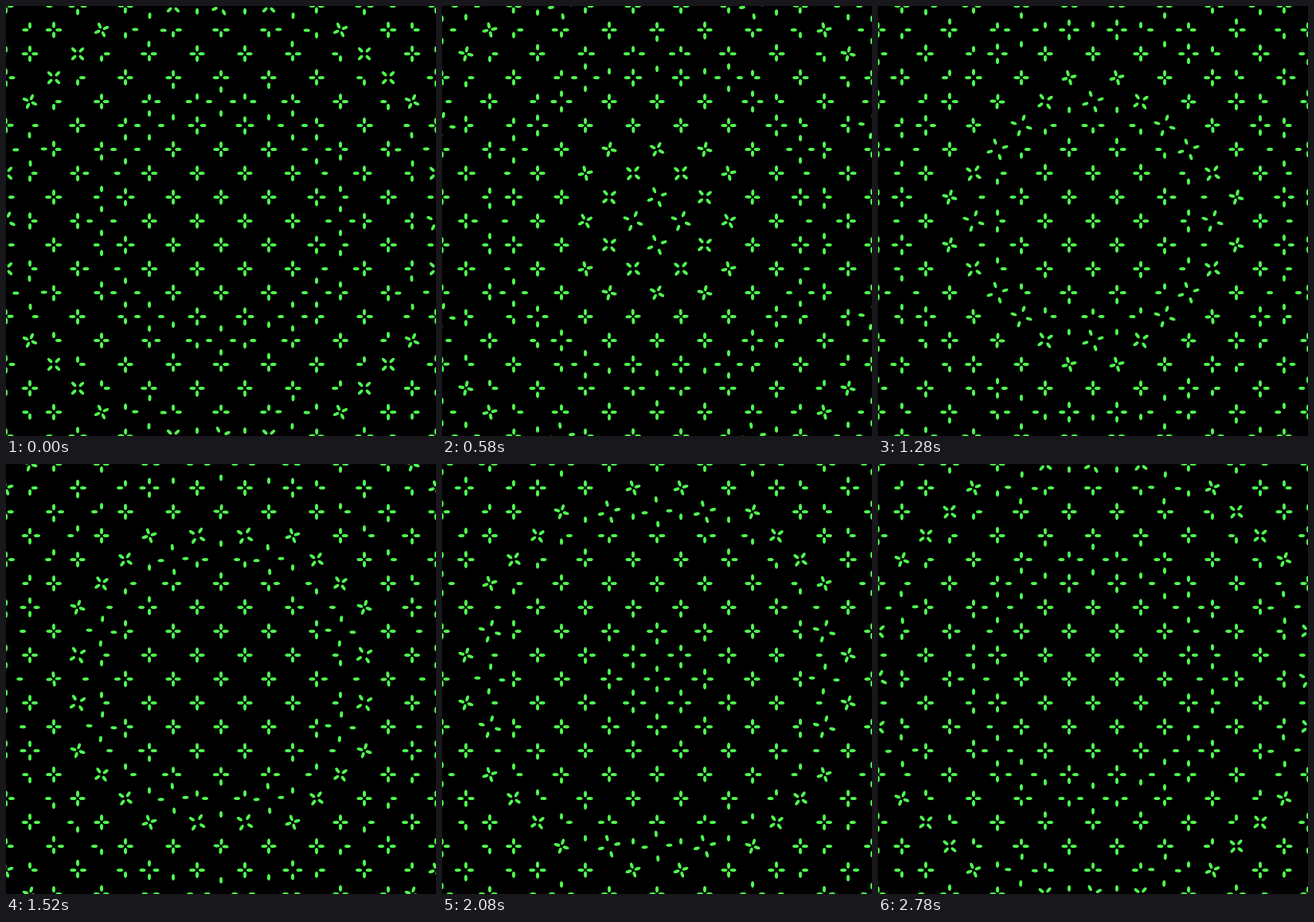
These frames come from a looping animation (540 px wide and 540 px high, 2800 ms). An HTML page:

```html
<!DOCTYPE html>
<html lang="en">
<head>
<meta charset="utf-8">
<title>Petal lattice</title>
<style>
  html, body { margin: 0; width: 100%; height: 100%; overflow: hidden; background: #000; }
  svg { display: block; width: 100vw; height: 100vh; }
</style>
</head>
<body>
<svg id="stage" viewBox="0 0 540 540" fill="#50ff50"></svg>
<script>
const LOOP = 2800;
const CELL = 30;
const CELLS = 18;
const CENTER = CELLS / 2;
const DELAY = 0.01;      // share of the loop per squared cell of distance
const NEAR = 5.6;        // petal distance in a closed flower
const FAR = CELL - NEAR; // petal distance once it joins the neighbours
const SPIN_SHARE = 0.6;  // part of the opening spent turning

const stage = document.getElementById('stage');

function add(parent, name, attrs = {}) {
  const node = document.createElementNS('http://www.w3.org/2000/svg', name);
  for (const key in attrs) node.setAttribute(key, attrs[key]);
  return parent.appendChild(node);
}

function ease(p, power) {
  p = Math.min(1, Math.max(0, p));
  return p < 0.5 ? Math.pow(2 * p, power) / 2 : 1 - Math.pow(2 - 2 * p, power) / 2;
}

const flowers = [];
for (let row = -1; row <= CELLS + 1; row++) {
  for (let col = -1; col <= CELLS + 1; col++) {
    if ((row + col) % 2 === 0) continue;
    const group = add(stage, 'g');
    const petals = [0, 90, 180, 270].map(angle =>
      add(group, 'ellipse', { rx: 4, ry: 2, transform: `rotate(${angle})` }));
    flowers.push({
      group,
      petals,
      x: col * CELL,
      y: row * CELL,
      turn: col % 2 ? 90 : -90,
      delay: DELAY * ((col - CENTER) ** 2 + (row - CENTER) ** 2)
    });
  }
}

function draw(time) {
  const t = time / LOOP;
  for (const { group, petals, x, y, turn, delay } of flowers) {
    const phase = 2 * (((t - delay) % 1 + 1) % 1);
    const opening = phase < 1;
    const spread = opening ? ease(phase, 4) : 1 - ease(phase - 1, 4);
    const angle = opening ? turn * ease(phase / SPIN_SHARE, 2) : 0;
    const radius = (NEAR + (FAR - NEAR) * spread).toFixed(2);
    group.setAttribute('transform', `translate(${x} ${y}) rotate(${angle.toFixed(2)})`);
    for (const petal of petals) petal.setAttribute('cx', radius);
  }
}

const start = performance.now();
function tick() {
  draw((performance.now() - start) % LOOP);
  requestAnimationFrame(tick);
}
tick();
</script>
</body>
</html>
```
